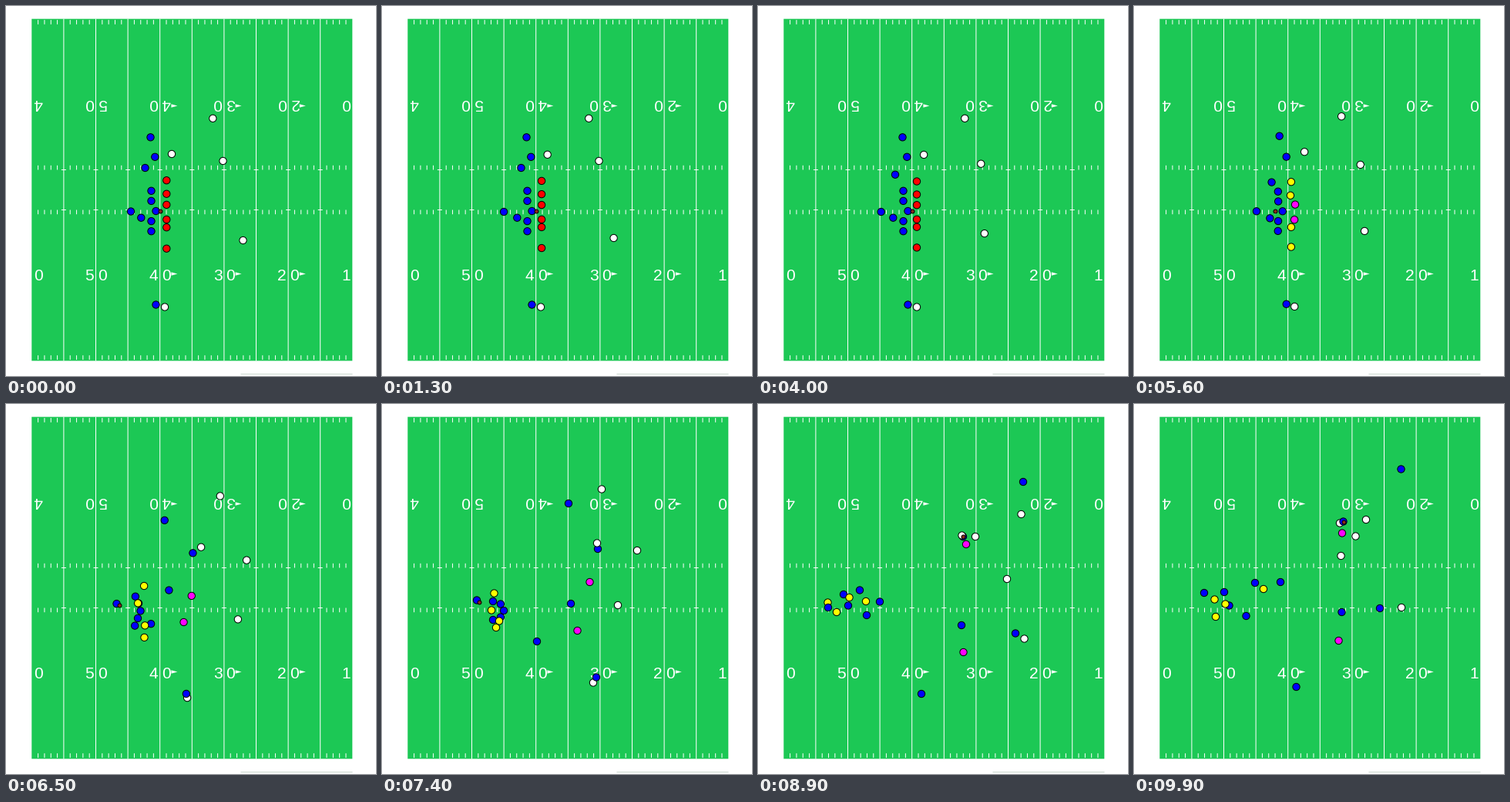
Write a matplotlib script that moves like this. It is 480 px wide and 480 px high and loops after 10 s.

```python
import numpy as np
import matplotlib.pyplot as plt
from matplotlib.animation import FuncAnimation
from matplotlib.collections import LineCollection
from matplotlib.patches import Polygon, Rectangle

SIZE, DPI = 480, 100
FRAMES, STEP = 100, 100
PX = 72 / DPI

# Phases of the play, in seconds.
SNAP, HANDS, THROW, CATCH = 5.3, 6.1, 7.7, 8.7
KEYS = (7.4, 8.9, 9.9)

LEFT, RIGHT, TOP, BOTTOM = 33.3, 449.3, 16.7, 460.3
YARD = (RIGHT - LEFT) / 50
MIDDLE = (TOP + BOTTOM) / 2

BLUE, RED, WHITE = "#0000ff", "#ff0000", "#ffffff"
RUSH, COVER = "#ffff00", "#ff00ff"


def route(start, *keys, to=None, via=None, begin=0, done=SNAP):
    """Shift from start to the set spot, then run through the key points."""
    to = to or start
    knots = [(-1, *start)]
    if begin > 0 or via is None:
        knots.append((begin, *start))
    else:
        knots.append((0, *start))
    if via:
        knots.append(via)
    if done < SNAP:
        knots.append((done, *to))
    knots.append((SNAP, *to))
    knots += [(t, *p) for t, p in zip(KEYS, keys)]
    return np.array(knots, float)


def along(path, times):
    """Cubic Hermite position; every stop up to the snap is eased to rest."""
    t, p = path[:, 0], path[:, 1:]
    m = np.gradient(p, t, axis=0)
    m[t <= SNAP] = 0
    i = np.clip(np.searchsorted(t, times, side="right") - 1, 0, len(t) - 2)
    h = (t[i + 1] - t[i])[:, None]
    u = (times - t[i])[:, None] / h
    ease = u * u * (3 - 2 * u)
    return (p[i] + ease * (p[i + 1] - p[i])
            + h * u * (1 - u) * ((1 - u) * m[i] - u * m[i + 1]))


def at(path, t):
    return along(path, np.array([t]))[0]


def blocker(i, *keys):
    """Evenly spaced on the line, then bent into a half ring as the pocket."""
    a = np.pi / 4 * (i - 2)
    spot = (188.5 + 6 * (i == 2), 266 + 13.1 * (i - 2))
    return route(spot, (144 + 14 * np.cos(a), 268 + 12 * np.sin(a)), *keys)


def front(y, *keys):
    """Creep up to the line and close in on its middle."""
    return route((208.3, y + 0.03 * (y - 270)), *keys, to=(206, y), done=2.5)


blockers = [
    blocker(0, (111, 247), (117, 244)),
    blocker(1, (132, 241.5), (157, 232)),
    blocker(2, (158, 256.5), (190, 231)),
    blocker(3, (141, 274), (145.5, 275)),
    blocker(4, (117, 261.5), (123.5, 261.5)),
]
passer = route((162, 266.5), (123, 254.5), (91, 264), (91, 245),
               to=(160.3, 267), via=(1.4, 158, 267))
runner = route((175.3, 274.7), (201, 308), (212, 376), (210.5, 367))
wide = route((187.5, 170.3), (242, 129), (344, 101), (346.5, 84.5))
catcher = route((193.3, 195.8), (280, 188), (266, 172), (271.5, 152.5))
motion = route((180.5, 210), (245, 259), (264, 287), (269.5, 270),
               to=(175.5, 227.5), begin=2.7)
far = route((194.5, 387.5), (278, 354.5), (334, 297.5), (319, 265))

rushers = [
    front(227.5, (145.5, 245.5), (90.5, 257.5), (104.5, 253.5)),
    front(244.5, (142, 267.5), (140, 256), (168, 240)),
    front(286.7, (152, 281.5), (118.5, 251), (118.5, 259.5)),
    front(313.4, (148, 290), (102, 270), (106, 276)),
]
backers = [
    front(258.2, (269.5, 231), (270, 182), (270, 167.5)),
    front(276.8, (253.5, 294), (266.5, 322), (265.5, 307)),
]
corner = route((268.3, 145.8), (285, 110.5), (282, 172), (267, 154.5))
nickel = route((215, 192), (279, 180.5), (264.5, 170.5), (287.5, 171.5),
               to=(218, 189.5), via=(3.3, 214, 194.3))
deep = route((281.5, 201), (331, 190), (341.5, 143), (301, 150),
             to=(292, 206), begin=1.4)
rover = route((307.5, 304), (306, 261), (323, 227), (268.5, 197),
              to=(299, 293), via=(3, 290.3, 296.5))
edge = route((206, 390.5), (274, 361.5), (345.5, 304.5), (347, 264))


def squad(paths, early, late=None):
    return [(p, early, late or early) for p in paths]


# Back to front.
players = (squad([corner, deep, rover, edge], WHITE)
           + squad(blockers + [runner, wide, catcher, motion, far], BLUE)
           + squad(rushers, RED, RUSH) + squad(backers, RED, COVER)
           + squad([nickel], WHITE) + squad([passer], BLUE))
paths, before, after = zip(*players)
times = np.arange(FRAMES) * STEP / 1000
tracks = np.stack([along(p, times) for p in paths], axis=1)


def held(t):
    return at(passer, t) + (3, 2)


def ball_at(t):
    spot = np.array((200.0, 266.0))
    if t < SNAP:
        return spot
    if t < HANDS:
        return spot + (held(HANDS) - spot) * (t - SNAP) / (HANDS - SNAP)
    if t < THROW:
        return held(t)
    if t < CATCH:
        a, b = held(THROW), at(catcher, CATCH)
        return a + (b - a) * (t - THROW) / (CATCH - THROW)
    return at(catcher, t)


def draw_field(ax):
    ax.add_patch(Rectangle((LEFT, TOP), RIGHT - LEFT, BOTTOM - TOP,
                           fc="#1cc855", lw=0, snap=False))
    lines = []
    for yd in range(1, 50):
        x = LEFT + yd * YARD
        for side in (-1, 1):
            hash_y = MIDDLE + side * 26
            if yd % 5 == 0:
                lines.append([(x - 3, hash_y), (x + 3, hash_y)])
            else:
                for y in (hash_y, MIDDLE + side * 214.7):
                    lines.append([(x, y), (x, y + side * 5.7)])
        if yd % 5 == 0:
            lines.append([(x, TOP), (x, BOTTOM)])
    ax.add_collection(LineCollection(lines, colors="white", linewidths=PX,
                                     snap=False))


def digit(ax, x, side, s):
    # The text box keeps room for descenders, hence the extra 2 px.
    ax.text(x, MIDDLE + side * (110 + 2), s, rotation=0 if side > 0 else 180,
            color="white", fontsize=21 * PX, family="Liberation Sans",
            ha="center", va="center")


def draw_numbers(ax):
    for i, tens in enumerate("454321"):
        x = LEFT + 10 * i * YARD
        for side in (-1, 1):
            pair = (tens + "0")[::side]
            if i > 0:
                digit(ax, x - YARD, side, pair[0])
            if i < 5:
                digit(ax, x + YARD, side, pair[1])
            if 2 <= i <= 4:
                a, y = x + 18.7, MIDDLE + side * 109
                ax.add_patch(Polygon([(a - 4, y - 2.2), (a - 4, y + 2.2),
                                      (a + 4, y)], fc="white", lw=0))


fig = plt.figure(figsize=(SIZE / DPI, SIZE / DPI), dpi=DPI, facecolor="white")
ax = fig.add_axes((0, 0, 1, 1))
ax.set(xlim=(0, SIZE), ylim=(SIZE, 0))
ax.axis("off")
draw_field(ax)
draw_numbers(ax)
ax.plot([305, 449], [477.5, 477.5], color="#c9d6cd", lw=PX, snap=False)

dots = ax.scatter(*tracks[0].T, s=(9.3 * PX) ** 2, c=before, snap=False,
                  edgecolors="black", linewidths=PX, zorder=5)
ball = ax.scatter(*ball_at(0), s=(5 * PX) ** 2, c="#8b2a1a", snap=False,
                  edgecolors="black", linewidths=PX, zorder=6)


def update(i):
    t = times[i]
    dots.set_offsets(tracks[i])
    dots.set_facecolor(before if t < SNAP else after)
    ball.set_offsets([ball_at(t)])
    return dots, ball


anim = FuncAnimation(fig, update, frames=FRAMES, interval=STEP,
                     repeat=True, repeat_delay=0)
plt.show()
```
